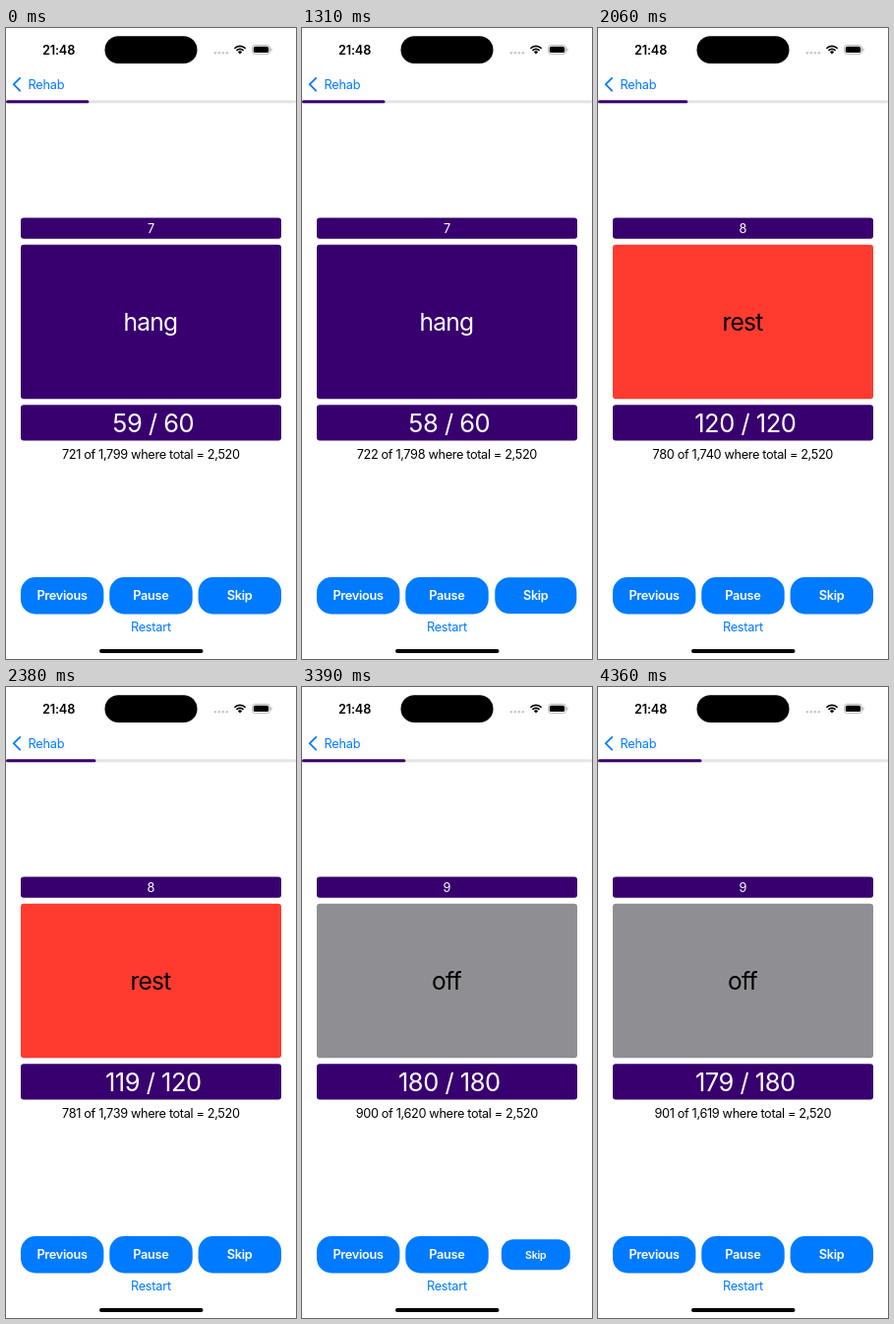
An HTML page with a canvas that plays this animation: 295 by 640 pixels, repeating every 5.19 s.

```html
<!DOCTYPE html>
<html lang="en">
<head>
<meta charset="utf-8">
<title>Workout timer</title>
<style>
  html, body { margin: 0; width: 100%; height: 100%; overflow: hidden; background: #fff; }
  canvas { display: block; width: 295px; height: 640px; }
</style>
</head>
<body>
<canvas id="stage"></canvas>
<script>
const W = 295, H = 640, LOOP = 5190, TOTAL = 2520;
const BLUE = '#007aff', PURPLE = '#38006f', RED = '#ff3b30', GRAY = '#8e8e93';

const canvas = document.getElementById('stage');
const ctx = canvas.getContext('2d');
const dpr = window.devicePixelRatio || 1;
canvas.width = W * dpr;
canvas.height = H * dpr;
ctx.scale(dpr, dpr);

const intervals = {
  hang: { round: 7, length: 60, fill: PURPLE, ink: '#fff' },
  rest: { round: 8, length: 120, fill: RED, ink: '#000' },
  off: { round: 9, length: 180, fill: GRAY, ink: '#000' }
};

// Timer state from each moment on
const states = [
  { at: 0, name: 'hang', left: 59, done: 721 },
  { at: 440, name: 'hang', left: 58, done: 722 },
  { at: 1420, name: 'rest', left: 120, done: 780 },
  { at: 2380, name: 'rest', left: 119, done: 781 },
  { at: 3390, name: 'off', left: 180, done: 900 },
  { at: 4360, name: 'off', left: 179, done: 901 }
];

// Moments at which the tapped button is redrawn
const taps = [
  { start: 1283, ticks: [1310, 1420, 1530, 1640, 1760, 1860, 1960, 2060] },
  { start: 3244, ticks: [3270, 3390, 3490, 3600, 3720, 3820, 3930, 4050] }
];

// Critically damped response to a step, t in ms
function spring(t) {
  if (t <= 0) return 0;
  const x = t * 2 * Math.PI / 500;
  return 1 - (1 + x) * Math.exp(-x);
}

function skipScale(t) {
  const tap = taps.findLast(p => t >= p.ticks[0]);
  if (!tap) return 1;
  const tick = tap.ticks.findLast(v => t >= v);
  if (tick === tap.ticks.at(-1)) return 1;
  const dt = tick - tap.start;
  return 1 - 0.34 * (spring(dt) - spring(dt - 120));
}

function box(x, y, w, h, r, fill) {
  ctx.fillStyle = fill;
  ctx.beginPath();
  ctx.roundRect(x, y, w, h, r);
  ctx.fill();
}

function text(str, x, y, { size = 12.75, weight = 400, color = '#000', track = -0.33 } = {}) {
  ctx.font = `${weight} ${size}px Inter, Roboto, sans-serif`;
  ctx.letterSpacing = track + 'px';
  ctx.textAlign = 'center';
  ctx.fillStyle = color;
  ctx.fillText(str, x + track / 2, y);
}

function button(label, x, scale = 1) {
  ctx.save();
  ctx.translate(x, 575.7);
  ctx.scale(scale, scale);
  box(-42.2, -18.7, 84.4, 37.4, 15, BLUE);
  text(label, 0, 4.7, { weight: 600, color: '#fff', track: -0.3 });
  ctx.restore();
}

function wifi(x, y) {
  ctx.strokeStyle = ctx.fillStyle = '#000';
  ctx.lineWidth = 1.7;
  for (const r of [8, 5]) {
    ctx.beginPath();
    ctx.arc(x, y, r, -Math.PI * 0.75, -Math.PI * 0.25);
    ctx.stroke();
  }
  ctx.beginPath();
  ctx.moveTo(x, y);
  ctx.arc(x, y, 3, -Math.PI * 0.75, -Math.PI * 0.25);
  ctx.fill();
}

function battery(x, y) {
  ctx.strokeStyle = '#a6a6a6';
  ctx.lineWidth = 0.8;
  ctx.beginPath();
  ctx.roundRect(x, y, 18, 9, 2.8);
  ctx.stroke();
  box(x + 1.3, y + 1.3, 15.4, 6.4, 1.7, '#000');
  box(x + 18.9, y + 3, 1, 3, 0.5, '#a6a6a6');
}

function header(progress) {
  text('21:48', 53.7, 26.5, { weight: 600, track: -0.2 });
  box(100.5, 8.3, 94, 27.8, 13.9, '#000');
  for (let i = 0; i < 4; i++) box(211.6 + i * 4, 24, 2.5, 2.5, 1.25, '#c4c4c6');
  wifi(238, 26.4);
  battery(250.5, 17.4);

  ctx.strokeStyle = BLUE;
  ctx.lineWidth = 1.8;
  ctx.lineCap = ctx.lineJoin = 'round';
  ctx.beginPath();
  ctx.moveTo(14.2, 50.8);
  ctx.lineTo(7.8, 57.2);
  ctx.lineTo(14.2, 63.6);
  ctx.stroke();
  ctx.lineCap = 'butt';
  text('Rehab', 41, 61.6, { color: BLUE, track: -0.25 });

  box(0, 73.2, W, 3, 1.5, '#e4e4e6');
  box(0, 73.2, W * progress, 3, 1.5, PURPLE);
}

function draw(t) {
  const { name, left, done } = states.findLast(s => t >= s.at);
  const { round, length, fill, ink } = intervals[name];
  const num = n => n.toLocaleString('en-US');

  ctx.fillStyle = '#fff';
  ctx.fillRect(0, 0, W, H);
  header(done / TOTAL);

  box(15, 192.6, 265, 21.2, 3, PURPLE);
  text(round, 147.5, 207.9, { color: '#fff' });
  box(15, 219.8, 265, 156.4, 3, fill);
  text(name, 147.3, 307.2, { size: 24.6, color: ink, track: -0.8 });
  box(15, 382.2, 265, 36.4, 3, PURPLE);
  text(`${left} / ${length}`, 150, 409.7, { size: 25.5, color: '#fff', track: -0.5 });
  text(`${num(done)} of ${num(TOTAL - done)} where total = ${num(TOTAL)}`, 147.5, 437.3, { track: -0.36 });

  button('Previous', 57.2);
  button('Pause', 147.5);
  button('Skip', 237.8, skipScale(t));
  text('Restart', 147.5, 611.6, { color: BLUE, track: -0.25 });
  box(95, 630, 105.5, 4, 2, '#000');
}

function frame() {
  draw(performance.now() % LOOP);
  requestAnimationFrame(frame);
}
frame();
</script>
</body>
</html>
```
